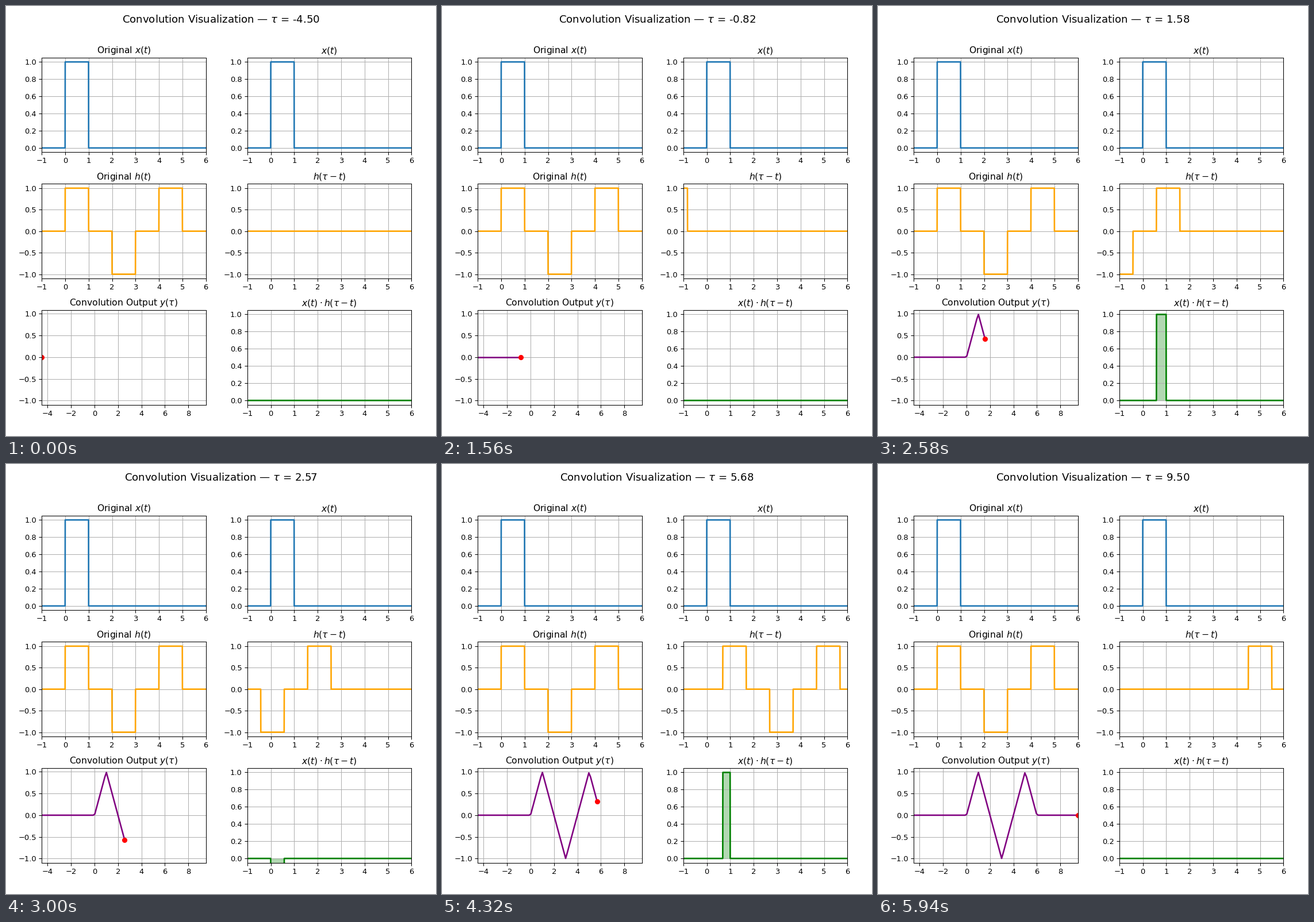
Write a matplotlib script that moves like this. It is 748 px wide and 748 px high and loops after 6 s.

```python
import matplotlib.pyplot as plt
import numpy as np
from matplotlib.animation import FuncAnimation

SIZE = 748
INCHES = 8
FRAMES = 100
INTERVAL = 60

# Panel geometry in pixels, measured from the top left corner
LEFTS = (62.2, 419.8)
BOTTOMS = (254.4, 474.0, 693.6)
WIDTH, HEIGHT = 285.5, 164.6

PULSES = ((0, 1), (2, -1), (4, 1))  # start and sign of each unit pulse in h


def x(t):
    return np.where((t >= 0) & (t < 1), 1.0, 0.0)


def h(t):
    return sum(sign * x(t - start) for start, sign in PULSES)


def convolve(tau):
    """Overlap of two unit pulses is a triangle."""
    return sum(sign * np.maximum(0, 1 - np.abs(tau - start - 1))
               for start, sign in PULSES)


t = np.linspace(-2, 7, 1801)
taus = np.linspace(-4.5, 9.5, FRAMES)
y = convolve(taus)

fig = plt.figure(figsize=(INCHES, INCHES), dpi=SIZE / INCHES)
suptitle = fig.suptitle("", fontsize=14)


def panel(row, col, title, xlim, ylim):
    ax = fig.add_axes((LEFTS[col] / SIZE, 1 - BOTTOMS[row] / SIZE,
                       WIDTH / SIZE, HEIGHT / SIZE))
    ax.set_title(title)
    ax.set_xlim(xlim)
    ax.set_ylim(ylim)
    ax.grid(True)
    return ax


T_RANGE = (-1, 6)
UNIT = (-0.05, 1.05)
SIGNED = (-1.1, 1.1)

ax_x0 = panel(0, 0, "Original $x(t)$", T_RANGE, UNIT)
ax_x = panel(0, 1, "$x(t)$", T_RANGE, UNIT)
ax_h0 = panel(1, 0, "Original $h(t)$", T_RANGE, SIGNED)
ax_h = panel(1, 1, r"$h(\tau - t)$", T_RANGE, SIGNED)
ax_y = panel(2, 0, r"Convolution Output $y(\tau)$", (taus[0], taus[-1]),
             (y.min() - 0.1, y.max() + 0.1))
ax_p = panel(2, 1, r"$x(t) \cdot h(\tau - t)$", T_RANGE, UNIT)

for ax in (ax_x0, ax_x):
    ax.plot(t, x(t), lw=2)
ax_h0.plot(t, h(t), color="orange", lw=2)
h_line, = ax_h.plot([], [], color="orange", lw=2)
p_line, = ax_p.plot([], [], color="green", lw=2)
p_fill = ax_p.fill_between(t, 0 * t, color="green", alpha=0.3)
y_line, = ax_y.plot([], [], color="purple", lw=2)
y_dot, = ax_y.plot([], [], "ro")

# Fixed ticks keep the grid independent of label size
for ax in (ax_x0, ax_x, ax_h0, ax_h, ax_p):
    ax.set_xticks(range(-1, 7))
for ax in (ax_x0, ax_x, ax_p):
    ax.set_yticks(np.arange(6) / 5)
for ax in (ax_h0, ax_h, ax_y):
    ax.set_yticks(np.arange(-2, 3) / 2)
ax_y.set_xticks(range(-4, 9, 2))


def update(i):
    global p_fill
    tau = taus[i]
    flipped = h(tau - t)
    product = x(t) * flipped

    h_line.set_data(t, flipped)
    p_line.set_data(t, product)
    p_fill.remove()
    p_fill = ax_p.fill_between(t, product, color="green", alpha=0.3)
    y_line.set_data(taus[:i + 1], y[:i + 1])
    y_dot.set_data([tau], [y[i]])
    suptitle.set_text(rf"Convolution Visualization — $\tau$ = {tau:.2f}")
    return h_line, p_line, p_fill, y_line, y_dot, suptitle


anim = FuncAnimation(fig, update, frames=FRAMES, interval=INTERVAL,
                     init_func=lambda: (), repeat=True, repeat_delay=0)
plt.show()
```
